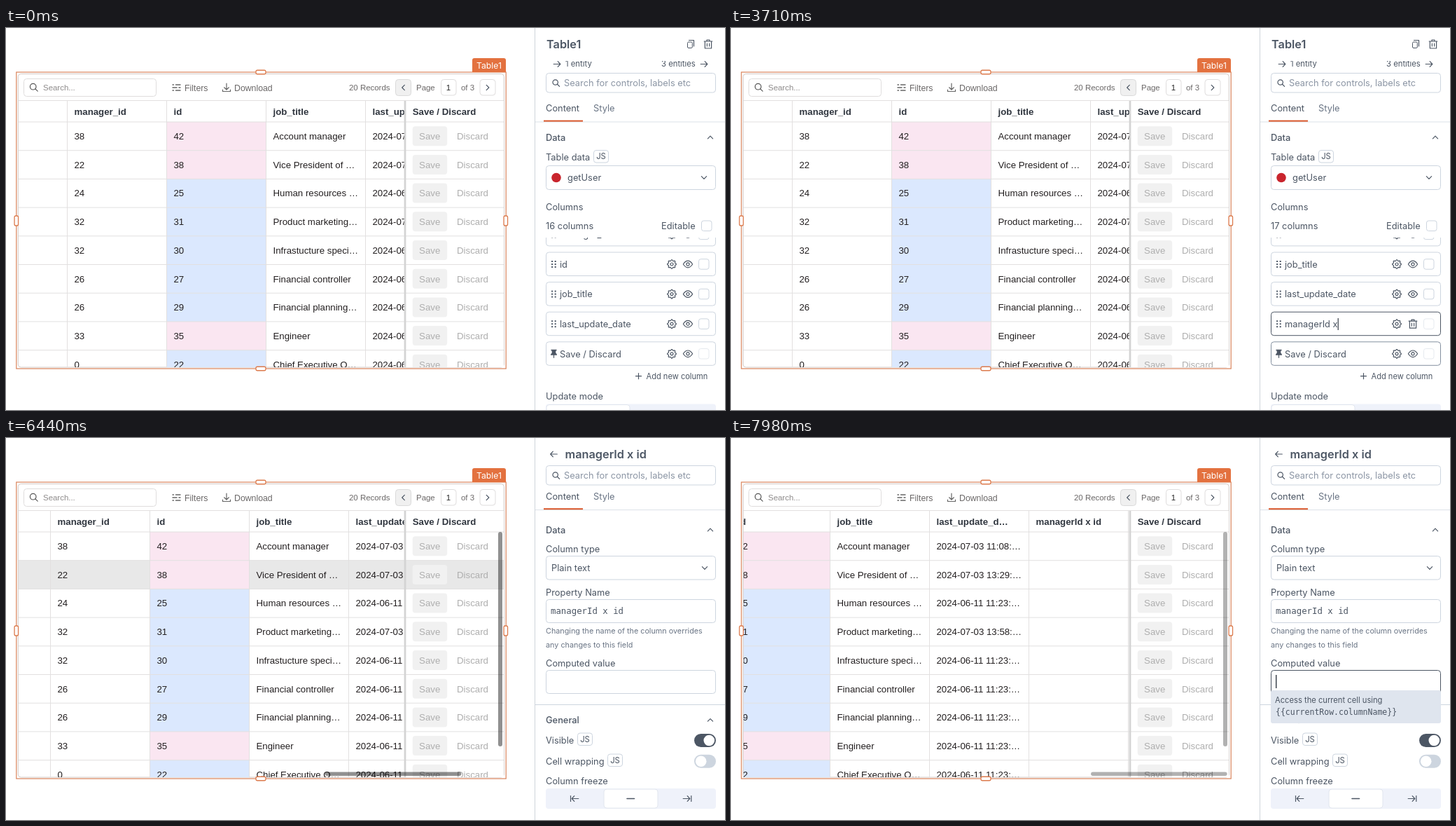
An HTML page that plays this animation: 1027 by 545 pixels, repeating every 8000 ms.

```html
<!DOCTYPE html>
<html lang="en">
<head>
<meta charset="utf-8">
<title>Table editor</title>
<style>
html, body { margin: 0; width: 100%; height: 100%; overflow: hidden; background: #fff; }
svg { display: block; width: 1027px; height: 545px; }
text { white-space: pre; }
.p { font: 12.85px Inter, "Open Sans", sans-serif; fill: #4c5664; }
.m { font-weight: 500; }
.ph { fill: #8b95a4; }
.title { font: 600 16.3px Inter, sans-serif; fill: #4c5664; }
.s { font: 11.3px Inter, sans-serif; fill: #4c5664; }
.hint { font: 10.8px Inter, sans-serif; fill: #6a7585; }
.mono { font: 12.35px "DejaVu Sans Mono", monospace; fill: #4c5664; }
.c { font: 13.25px "Liberation Sans", Arial, sans-serif; fill: #231f20; }
.h { font-weight: bold; fill: #30363f; }
.b { font: 12.3px "Liberation Sans", Arial, sans-serif; fill: #6b6868; }
.bs { font: 11.45px "Liberation Sans", Arial, sans-serif; fill: #6b6868; }
.off { fill: #aeaeae; }
.i { fill: none; stroke: #4c5664; stroke-width: 1.2; stroke-linecap: round; stroke-linejoin: round; }
.box { fill: #fff; stroke: #cdd5df; }
</style>
</head>
<body>
<svg id="stage" viewBox="0 0 1027 545" xmlns="http://www.w3.org/2000/svg"></svg>
<script>
const LOOP = 8000, STEP = 70;
const ROW_TOP = 134, ROW_H = 40.7, COL_W = 142, PANEL_W = 271;

// Drawing helpers
const text = (x, y, s, cls = 'p', more = '') => `<text x="${x}" y="${y}" class="${cls}" ${more}>${s}</text>`;
const rect = (x, y, w, h, fill, more = '') => `<rect x="${x}" y="${y}" width="${w}" height="${h}" fill="${fill}" ${more}/>`;
const box = (x, y, w, h, rx = 4, more = '') => `<rect x="${x}" y="${y}" width="${w}" height="${h}" rx="${rx}" class="box" ${more}/>`;
const path = (d, more = '') => `<path class="i" d="${d}" ${more}/>`;
const at = (x, y, s) => `<g transform="translate(${x} ${y})">${s}</g>`;
const hline = (y, x1, x2, color) => rect(x1, y, x2 - x1, 1, color);
const mid = 'text-anchor="middle"';

// Icons, each centred on its position
const cog = Array.from({ length: 32 }, (_, k) => {
  const a = (k - 0.5) * Math.PI / 16, r = k % 4 < 2 ? 6.3 : 5;
  return (r * Math.cos(a)).toFixed(2) + ' ' + (r * Math.sin(a)).toFixed(2);
}).join('L');
const gear = (x, y) => at(x, y, path(`M${cog}Z`) + '<circle r="2" class="i"/>');
const eye = (x, y) => at(x, y, path('M-6.6 0Q-3.6-4.8 0-4.8T6.6 0Q3.6 4.8 0 4.8T-6.6 0Z') + '<circle r="2.1" class="i"/>');
const trash = (x, y) => at(x, y, path('M-5.8-4H5.8M-2-4V-6H2V-4M-4.6-4V6H4.6V-4M-1.6-1V3M1.6-1V3'));
const lens = (x, y, r, color) => at(x, y, `<circle cx="-.8" cy="-.8" r="${r}" class="i" style="stroke:${color}"/>` +
  path(`M${r * .7 - .6} ${r * .7 - .6}L${r + 1.4} ${r + 1.4}`, `style="stroke:${color}"`));
const chevron = (x, y, turn = 0) => `<g transform="translate(${x} ${y}) rotate(${turn})">${path('M-3.6 1.8L0-1.8L3.6 1.8', 'stroke-width="1.4"')}</g>`;
const arrow = (x, y, dir) => at(x, y, path(`M${-4.8 * dir} 0H${4.8 * dir}M${1.2 * dir}-3.8L${4.8 * dir} 0L${1.2 * dir} 3.8`));
const pin = (x, y) => at(x, y, '<path fill="#4c5664" d="M-4-6H4V-4.4H2.8V-1Q4.6 0 4.6 2H.6V6H-.6V2H-4.6Q-4.6 0-2.8-1V-4.4H-4Z"/>');
const grip = (x, y) => [-4, 0, 4].map(d => rect(x - 3.4, y + d - 1, 2, 2, '#4c5664') + rect(x + 1.2, y + d - 1, 2, 2, '#4c5664')).join('');
const jsTag = (x, y) => box(x, y, 21, 17.5, 3.5) + text(x + 10.5, y + 12.8, 'JS', 's m', mid);

// Table data
const managers = [38, 22, 24, 32, 32, 26, 26, 33, 0];
const ids = [42, 38, 25, 31, 30, 27, 29, 35, 22];
const jobs = ['Account manager', 'Vice President of …', 'Human resources …', 'Product marketing…', 'Infrastucture speci…',
  'Financial controller', 'Financial planning…', 'Engineer', 'Chief Executive O…'];
const early = { 0: '07-03 11:08', 1: '07-03 13:29', 3: '07-03 13:58' };
const heads = ['manager_id', 'id', 'job_title', 'last_update_d…', 'managerId x id'];
const rowY = r => ROW_TOP + r * ROW_H;

function cells() {
  let s = '';
  ids.forEach((id, r) => {
    const y = rowY(r), date = `2024-${early[r] || '06-11 11:23'}:…`;
    s += rect(230, y, COL_W, ROW_H, id > 34 ? '#fae6f1' : '#dbe8fe');
    [managers[r], id, jobs[r], date].forEach((v, c) => s += text(97.5 + c * COL_W, y + 25, v, 'c'));
  });
  heads.forEach((v, c) => s += text(97.5 + c * COL_W, 123.8, v, 'c h'));
  for (let c = 0; c < 6; c++) s += rect(87 + c * COL_W, 104, 1, 380, '#e2e0e0');
  return s;
}

const rowLines = (x1, x2) => ids.map((_, r) => hline(rowY(r) - .5, x1, x2, '#e2e0e0')).join('');

const sticky = () => ids.map((_, r) => {
  const y = rowY(r);
  return rect(580.7, y + 6.2, 49.5, 28, '#f1f1f1', 'rx="4"') +
    text(605.2, y + 25, 'Save', 'c off', mid) + text(644, y + 25, 'Discard', 'c off');
}).join('');

const pill = (x, y, w, h) => rect(x - w / 2, y - h / 2, w, h, '#fff', 'rx="2" stroke="#dc7a4c" stroke-width="1.3"');

function table() {
  const toolbar = box(25.5, 72.5, 189, 25, 4, 'style="stroke:#dfdddd"') + lens(39.5, 84.5, 4.3, '#555') +
    text(53, 88.6, 'Search...', 'bs', 'style="fill:#8e8b8b"') +
    path('M238 81H239.5M242.5 81H249M238 85H244M247 85H249M238 89H239.5M242.5 89H249', 'style="stroke:#666;stroke-width:1.4"') +
    text(255, 89.8, 'Filters', 'b') +
    path('M315 79V88M311.6 84.8L315 88L318.4 84.8M309.5 88V90.5H320.5V88', 'style="stroke:#666"') +
    text(326, 89.8, 'Download', 'b') + text(490, 88.8, '20 Records', 'bs') +
    box(556.5, 73.5, 22, 23, 4, 'style="fill:#f0f0f0;stroke:#dadada"') + chevron(567.5, 85, -90) +
    text(586, 88.8, 'Page', 'bs') + box(621.5, 73.5, 21.5, 22.5, 4, 'style="stroke:#dfdddd"') +
    text(632, 88.8, '1', 'bs', mid + ' style="fill:#222"') + text(650, 88.8, 'of 3', 'bs') +
    box(677, 73.5, 22, 22.5, 4, 'style="stroke:#dfdddd"') + chevron(688, 85, 90);
  return rect(14.8, 63, 699.4, 423, '#fff', 'stroke="#d9835a" stroke-width="1.2"') +
    rect(17.3, 65.5, 694, 418.5, '#fff', 'rx="4" stroke="#d3cac6"') + toolbar +
    '<g clip-path="url(#body)">' + hline(103, 18, 711, '#e2e0e0') +
    `<g clip-path="url(#cols)"><rect id="hoverA" x="18" width="552" height="${ROW_H}" fill="#e8e8e8"/>` +
    `<g id="scroll">${cells()}</g></g>` + rowLines(18, 570) +
    rect(570, 104, 141, 380, '#fff') + `<rect id="hoverB" x="570" width="141" height="${ROW_H}" fill="#e8e8e8"/>` +
    text(580.7, 123.8, 'Save / Discard', 'c h') + sticky() + rowLines(570, 711) + rect(568.6, 104, 2.8, 380, '#d4d4d4') +
    '<g id="bars">' + rect(703, 134, 6, 306, '#000', 'rx="3"') +
    '<rect id="barX" y="476.5" width="194.5" height="5.5" rx="2.7"/></g></g>' +
    pill(364, 63, 14, 5.5) + pill(364, 486, 14, 5.5) + pill(14.8, 275, 5.5, 14) + pill(713.8, 275, 5.5, 14) +
    '<path d="M666 63V46Q666 43 669 43H711Q714 43 714 46V63Z" fill="#e3713f"/>' +
    text(690, 57.5, 'Table1', 'p', mid + ' style="font-size:12.2px;fill:#fff"');
}

// Property panel parts shared by both views
const searchBox = y => box(771.5, y, 242, 27.5) + lens(785.5, y + 13.8, 3.7, '#4c5664') +
  text(797, y + 18.6, 'Search for controls, labels etc', 'p ph');
const tabs = y => text(771, y, 'Content') + text(839, y, 'Style', 'p', 'style="fill:#6a7585"') +
  hline(y + 14.5, 756, 1027, '#dce1e8') + rect(768, y + 12.6, 56, 2, '#d9572b');
const section = (y, s) => text(771, y, s, 'p m') + chevron(1006, y - 4.8);

function mainPanel() {
  return text(772, 28.8, 'Table1', 'title') +
    box(973.5, 20, 6.8, 8.5, 1.5, 'style="stroke:#4c5664"') + path('M975.5 17.5H982.5V26') + trash(1003, 23) +
    `<g clip-path="url(#links)">${arrow(787, 51.5, 1)}${text(799, 55.4, '1 entity', 's')}` +
    `${text(936, 55.4, '3 entities', 's')}${arrow(997, 51.5, 1)}</g>` +
    searchBox(64.5) + tabs(119) + section(160.8, 'Data') +
    text(771, 189.4, 'Table data') + jsTag(839.5, 174.5) +
    box(771.5, 196.5, 242, 34) + '<circle cx="786" cy="213.5" r="6.8" fill="#c9252d"/>' +
    text(802, 218, 'getUser') + chevron(997, 213.5, 180) +
    text(771, 259.8, 'Columns') + '<text id="count" x="771" y="287" class="p"></text>' +
    text(936, 287, 'Editable') + box(993.5, 275, 14.5, 14.5, 3) +
    '<g id="list" clip-path="url(#listClip)"></g>' +
    `<g id="add">${path('M899.5 496.7H907.5M903.5 492.7V500.7')}${text(914.5, 500.8, 'Add new column', 's m', 'style="font-size:11.1px"')}</g>` +
    text(771, 530, 'Update mode') + rect(771, 536.5, 243, 20, '#eff2fa', 'rx="4"') +
    rect(772, 537.5, 119, 20, '#fff', 'rx="4" stroke="#e1e6ee"');
}

function columnPanel() {
  const toggle = (y, on) => rect(983, y - 9.5, 31, 19, on ? '#4c5664' : '#cdd5df', 'rx="9.5"') +
    `<circle cx="${on ? 1004.3 : 992.7}" cy="${y}" r="7.8" fill="#fff"/>`;
  return arrow(782.5, 23, -1) + text(798.5, 28.8, 'managerId x id', 'title') +
    searchBox(39.5) + tabs(87.6) + section(135.8, 'Data') +
    text(771, 163.4, 'Column type') + box(771.5, 168.5, 242, 33.5) + text(779, 190.2, 'Plain text') + chevron(998, 185.5, 180) +
    text(771, 225, 'Property Name') + box(771.5, 230.5, 242, 33) + text(778, 251, 'managerId x id', 'mono') +
    text(771, 278.6, 'Changing the name of the column overrides', 'hint') + text(771, 298.6, 'any changes to this field', 'hint') +
    text(771, 326, 'Computed value') + '<rect id="editor" x="771.5" y="331.5" width="242" height="33" rx="4" class="box"/>' +
    hline(380, 756, 1027, '#cdd5df') + section(407.2, 'General') +
    text(771, 436, 'Visible') + jsTag(816.5, 421) + toggle(431.5, true) +
    text(771, 466, 'Cell wrapping') + jsTag(859.5, 451) + toggle(461.2, false) +
    text(771, 494.2, 'Column freeze') + rect(771, 500, 243, 29, '#eff2fa', 'rx="4"') +
    rect(854, 501, 77, 27, '#fff', 'rx="4" stroke="#e1e6ee"') +
    path('M806.5 510.5V518.5') + arrow(813, 514.5, -1) + path('M887 514.5H897.5', 'style="stroke-width:1.6"') +
    arrow(972, 514.5, 1) + path('M978.8 510.5V518.5') +
    '<g id="tip">' + rect(778, 338, 1.4, 19, '#333a44') + rect(771, 360, 243, 47, '#dfe5ee', 'rx="3"') +
    text(777, 378, 'Access the current cell using', 's', 'style="font-size:11.2px"') +
    text(778, 395, '{{currentRow.columnName}}', 'mono', 'style="font-size:11.5px"') + '</g>';
}

const clip = (id, x, y, w, h) => `<clipPath id="${id}">${rect(x, y, w, h, '#000')}</clipPath>`;
const stage = document.getElementById('stage');
stage.innerHTML = '<defs>' + clip('body', 18, 66, 693, 418) + clip('cols', 18, 104, 552, 380) +
  clip('links', 756, 47, 271, 20) + clip('listClip', 756, 299, 271, 185) + '</defs>' +
  rect(0, 0, 1027, 545, '#fff') + table() + `<g id="main">${mainPanel()}</g><g id="column">${columnPanel()}</g>` +
  rect(755, 0, 1, 545, '#cfd4db');

const el = id => document.getElementById(id);
const set = (id, attrs) => { for (const k in attrs) el(id).setAttribute(k, attrs[k]); };
const show = (id, on) => set(id, { display: on ? 'inline' : 'none' });

// Timeline
const NAME = 'managerId x id';
const keys = [1960, 2100, 2310, 2450, 2730, 2870, 3010, 3150, 3290, 3430, 3710, 3780, 3920, 4060];
const scrolls = [24, 70, 121, 164, 196, 218, 230];
const entry = [.125, .42, .7, .87, .96, 1];
const stepValue = (list, start, q) => q < start ? 0 : list[Math.min(list.length - 1, Math.floor((q - start) / STEP))];

function listRows(q) {
  const added = q >= 840;
  const typed = keys.filter(k => q >= k).length;
  const custom = typed ? NAME.slice(0, typed) : 'customColumn3';
  const names = ['manager_id', 'id', 'job_title', 'last_update_date', ...(added ? [custom] : []), 'Save / Discard'].slice(-5);
  return names.map((name, k) => {
    const y = 294.4 + k * 42.6, isNew = added && k === 3, pinned = k === 4;
    let edge = '#cdd5df';
    if (isNew && q >= 910) edge = '#4c5664';
    if (pinned && q >= 1120 && q < 4550) edge = '#8490a0';
    const hot = isNew && q >= 4900;
    return box(771.5, y - 17, 242, 33.5, 4, `style="stroke:${edge}"`) +
      (pinned ? pin(782.5, y) : grip(782.5, y)) +
      text(791, y + 4.8, name, 'p', isNew ? 'id="edit"' : '') +
      (hot ? rect(943, y - 8, 17, 16, q >= 5180 ? '#dfe4ec' : '#eceff4', 'rx="3"') : '') +
      gear(951, y) + (isNew ? trash(974, y) : eye(974, y)) +
      box(989.5, y - 7.3, 14.5, 14.5, 3, pinned || isNew ? 'style="stroke:#e6eaef"' : '');
  }).join('');
}

function hoveredRow(q) {
  if (q < 6020 || q >= 7420) return -1;
  return q < 6090 ? 2 : q < 7350 ? 1 : 3;
}

function draw(q) {
  const scroll = stepValue(scrolls, 6440, q);
  set('scroll', { transform: `translate(${-scroll} 0)` });
  const row = hoveredRow(q);
  for (const id of ['hoverA', 'hoverB']) {
    show(id, row >= 0);
    set(id, { y: rowY(Math.max(row, 0)) });
  }
  show('bars', q >= 6440);
  set('bars', { opacity: q >= 7980 ? .3 : .43 });
  set('barX', { x: 449 + scroll * .283 });

  show('main', q < 5390);
  el('count').textContent = (q < 840 ? 16 : 17) + ' columns';
  set('add', { opacity: q >= 560 && q < 840 ? .7 : 1 });
  el('list').innerHTML = listRows(q);
  const caret = (q >= 1330 && q < 1680) || (q >= 1960 && q < 4480);
  if (caret && q < 5390) {
    const x = 791 + el('edit').getComputedTextLength();
    el('list').insertAdjacentHTML('beforeend', rect(x, 414, 1.2, 17, '#333a44'));
  }

  const p = stepValue(entry, 5460, q);
  show('column', p > 0);
  set('column', { transform: `translate(${PANEL_W * (1 - p)} 0)`, opacity: p });
  show('tip', q >= 7770);
  set('editor', { style: q >= 7770 ? 'stroke:#4c5664' : '' });
}

let last = -1;
function tick() {
  const q = Math.floor((performance.now() % LOOP) / STEP) * STEP;
  if (q !== last) draw(last = q);
  requestAnimationFrame(tick);
}
tick();
</script>
</body>
</html>
```
